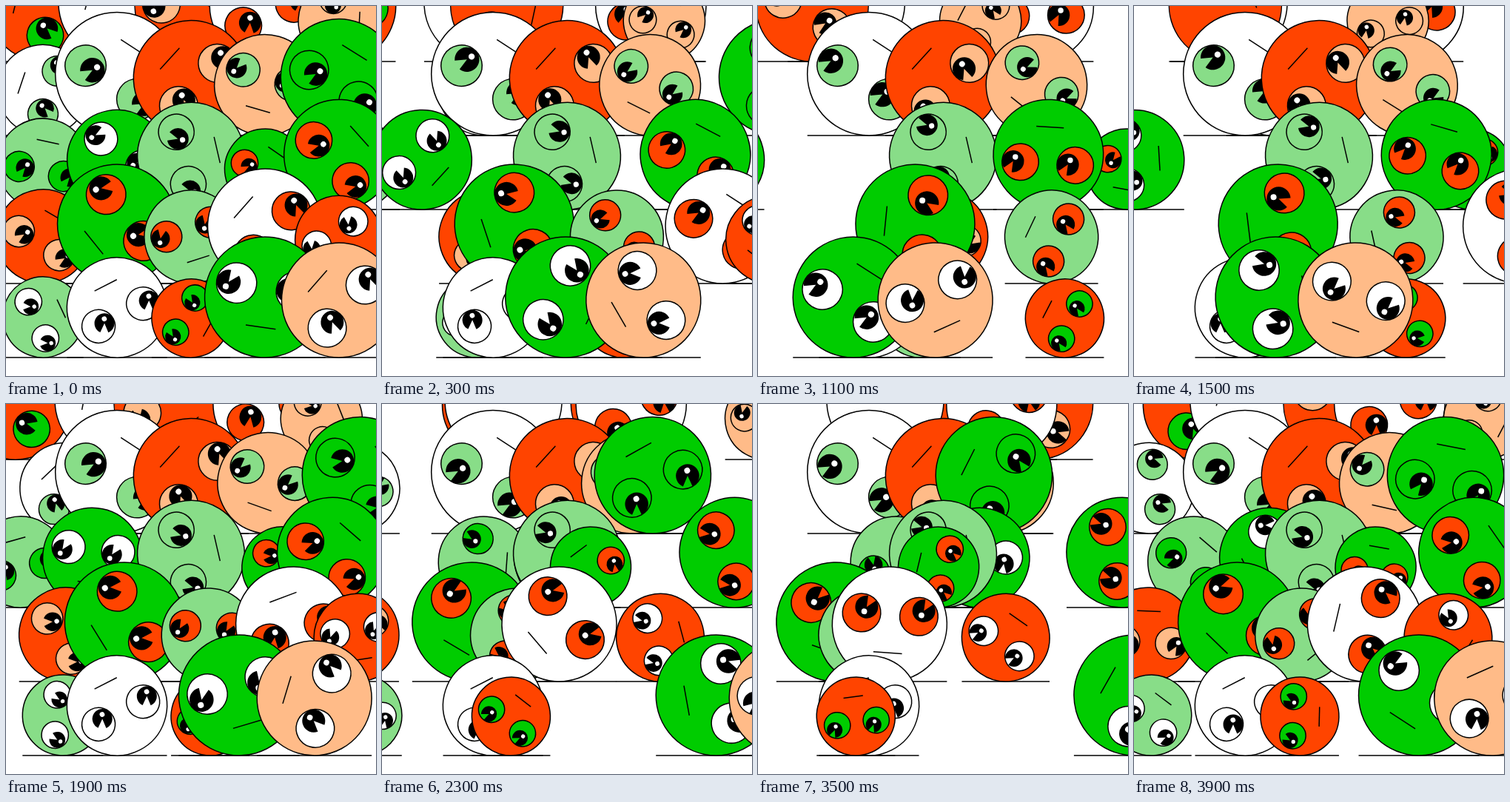
These frames come from a looping animation (500x500 px, 4000 ms). An HTML page with a canvas:

```html
<!DOCTYPE html>
<html lang="en">
<head>
<meta charset="utf-8">
<title>Rolling faces</title>
<style>
html, body { margin: 0; width: 500px; height: 500px; overflow: hidden; background: #fff; }
canvas { display: block; }
</style>
</head>
<body>
<canvas id="stage" width="500" height="500"></canvas>
<script>
const ctx = document.getElementById('stage').getContext('2d');
const LOOP = 4000, STEP = 100, TAU = Math.PI * 2, DEG = Math.PI / 180;
const COLORS = { w: '#fff', o: '#ff4400', g: '#00cc00', l: '#88dd88', s: '#ffbb88' };

// Per ball: body and eye colour, radius, swing in eighths of a half turn, resting tilt
const rows = [
  ['og 74 -8 104', 'ww 79 -1 104.6', 'os 76 -6 -16.5', 'wo 74.5 1 156.8', 'ss 55 -7 -87'],
  ['wl 61.3 8 108.5', 'wl 83.3 0 213', 'os 77.7 0 132.4', 'sl 68.2 1 16.3', 'gg 78.7 6 212.2'],
  ['lg 61.5 -8 192.4', 'gw 67.3 -8 34', 'll 72.3 0 -103', 'go 54.5 7 214.8', 'go 74.3 -2 228'],
  ['os 63.5 8 210.5', 'go 80.5 2 51.2', 'lo 63 6 -18', 'wo 77.5 8 131.2', 'ow 59.3 7 -33.5'],
  ['lw 54.5 8 -115', 'ww 67.5 0 153', 'og 53 8 -60.5', 'gw 81.5 -7 8.2', 'sw 77.5 -7 131.4']
];

const balls = rows.flatMap((row, j) => row.map((spec, i) => {
  const [look, ...nums] = spec.split(' ');
  const [r, swing, tilt] = nums.map(Number);
  return {
    x: 50 + 100 * i, floor: 75 + 100 * j, r,
    swing: swing * Math.PI / 8, tilt: tilt * DEG,
    body: COLORS[look[0]], eye: COLORS[look[1]]
  };
}));

function disc(x, y, r, fill, outlined) {
  ctx.beginPath();
  ctx.arc(x, y, r, 0, TAU);
  ctx.fillStyle = fill;
  ctx.fill();
  if (outlined) ctx.stroke();
}

function line(x1, y1, x2, y2) {
  ctx.beginPath();
  ctx.moveTo(x1, y1);
  ctx.lineTo(x2, y2);
  ctx.stroke();
}

// Pie-cut pupil circling inside the eye's rim
function drawEye(x, y, r, color, look) {
  disc(x, y, r / 3, color, true);
  const px = x + Math.cos(look) * r * 2 / 15;
  const py = y + Math.sin(look) * r * 2 / 15;
  ctx.beginPath();
  ctx.moveTo(px, py);
  ctx.arc(px, py, r / 5, -38 * DEG, 274 * DEG);
  ctx.fillStyle = '#000';
  ctx.fill();
  disc(px - r * 0.037, py + r * 0.081, r / 20, '#fff');
}

function drawBall({ x, floor, r, swing, tilt, body, eye }, s) {
  const cx = x + swing * r * s;
  line(cx - r, floor, cx + r, floor);
  ctx.save();
  ctx.translate(cx, floor - r);
  ctx.rotate(tilt + swing * s);
  disc(0, 0, r, body, true);
  line(-r / 4, r / 2, r / 4, r / 2);
  const look = Math.PI * (1 - s);
  for (const side of [-1, 1]) drawEye(side * r / 2, -r / 6, r, eye, look);
  ctx.restore();
}

function draw(ms) {
  const t = Math.floor(ms / STEP) * STEP % LOOP;
  const s = Math.sin(TAU * t / LOOP);
  ctx.fillStyle = '#fff';
  ctx.fillRect(0, 0, 500, 500);
  ctx.strokeStyle = '#000';
  ctx.lineWidth = 1.5;
  for (const ball of balls) drawBall(ball, s);
}

const start = performance.now();
function tick() {
  draw(performance.now() - start);
  requestAnimationFrame(tick);
}
tick();
</script>
</body>
</html>
```
